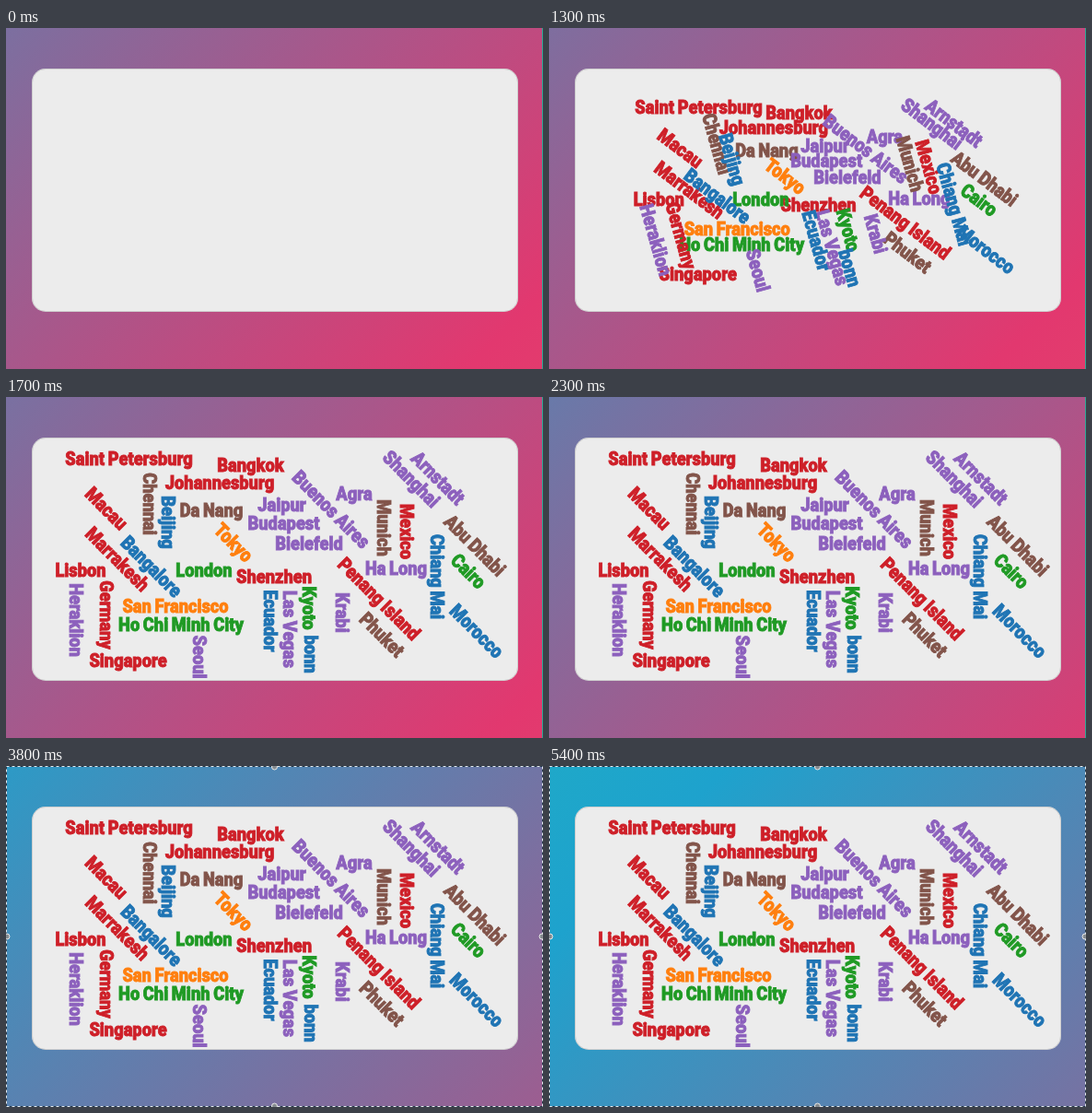
These frames come from a looping animation (583 by 370 pixels, 5.5 s). An HTML page:

```html
<!DOCTYPE html>
<html lang="en">
<head>
<meta charset="utf-8">
<title>City word cloud</title>
<style>
  html, body { margin: 0; width: 100%; height: 100%; overflow: hidden; }
  svg { display: block; width: 100vw; height: 100vh; }
  text {
    font: 900 21px Roboto, "Open Sans", "Liberation Sans", sans-serif;
    word-spacing: -1px;
    text-anchor: middle;
    stroke-width: .9;
  }
</style>
</head>
<body>
<svg id="stage" viewBox="0 0 583 370" preserveAspectRatio="none">
  <defs>
    <linearGradient id="sky" gradientUnits="userSpaceOnUse">
      <stop offset="0" stop-color="#ee7752"/>
      <stop offset=".3333" stop-color="#e2386f"/>
      <stop offset=".6667" stop-color="#1ea2cd"/>
      <stop offset="1" stop-color="#23d5ab"/>
    </linearGradient>
  </defs>
  <rect width="583" height="370" fill="url(#sky)"/>
  <rect x="582" width="1" height="370" fill="#2aa893"/>
  <rect x="28" y="44" width="528" height="264" rx="15" fill="#ececec"/>
  <rect x="28.5" y="44.5" width="527" height="263" rx="14.5" fill="none" stroke="#000" stroke-opacity=".125"/>
  <g id="cloud"></g>
  <g id="selection" fill="none">
    <rect x=".5" y=".5" width="582" height="369" stroke="#24384a"/>
    <rect x=".5" y=".5" width="582" height="369" stroke="#e4eaee" stroke-dasharray="3 3"/>
    <g id="handles" fill="#858b90" stroke="#e8e8e8"></g>
  </g>
</svg>
<script>
const LOOP = 5500, STEP = 100;
const RED = "#ce1f28", BLUE = "#1f74b4", GREEN = "#1f9a24",
      PURPLE = "#8c60bd", BROWN = "#82544a", ORANGE = "#ff7f0e";

// Words grouped by final angle: text, centre x, centre y, colour.
const groups = {
  0: [
    ["Saint Petersburg", 133.5, 67, RED], ["Bangkok", 265.5, 74, RED],
    ["Johannesburg", 232, 93, RED], ["Da Nang", 223, 123, BROWN],
    ["Lisbon", 81, 188, RED], ["Shenzhen", 291, 195, RED],
    ["London", 215, 188, GREEN], ["San Francisco", 184, 227, ORANGE],
    ["Ho Chi Minh City", 190, 247, GREEN], ["Singapore", 132.5, 286, RED],
    ["Agra", 378, 105, PURPLE], ["Jaipur", 299.5, 117, PURPLE],
    ["Budapest", 301.5, 137, PURPLE], ["Bielefeld", 329, 159, PURPLE],
    ["Ha Long", 423.5, 186, PURPLE]
  ],
  45: [
    ["Macau", 109, 121, RED], ["Marrakesh", 121, 176, RED],
    ["Penang Island", 405, 219, RED], ["Tokyo", 247, 158, ORANGE],
    ["Buenos Aires", 353, 122, PURPLE], ["Shanghai", 440, 89, PURPLE],
    ["Arnstadt", 469, 88, PURPLE], ["Abu Dhabi", 509, 161, BROWN],
    ["Phuket", 408, 258, BROWN], ["Cairo", 502, 189, GREEN],
    ["Bangalore", 158, 184, BLUE], ["Morocco", 511, 254, BLUE]
  ],
  90: [
    ["Chennai", 156, 116, BROWN], ["Munich", 410, 142, BROWN],
    ["Germany", 109, 236.5, RED], ["Mexico", 435, 146, RED],
    ["Heraklion", 76, 242, PURPLE], ["Seoul", 210, 282, PURPLE],
    ["Kyoto", 329, 229, GREEN], ["bonn", 331, 279, BLUE],
    ["Las Vegas", 308, 252, PURPLE], ["Krabi", 365, 234, PURPLE],
    ["Beijing", 176, 136, BLUE], ["Ecuador", 287, 243, BLUE],
    ["Chiang Mai", 468, 195, BLUE]
  ]
};

const byId = id => document.getElementById(id);
const sky = byId("sky"), cloud = byId("cloud"), selection = byId("selection");

function add(parent, tag, attrs) {
  const node = document.createElementNS("http://www.w3.org/2000/svg", tag);
  for (const key in attrs) node.setAttribute(key, attrs[key]);
  return parent.appendChild(node);
}

for (const [cx, cy] of [[291.5, 1], [291.5, 369], [1, 185], [582, 185]])
  add(byId("handles"), "circle", { cx, cy, r: 3 });

// Each word turns around the middle of its baseline.
const HALF_CAP = 7.2;
const words = Object.entries(groups).flatMap(([angle, list]) =>
  list.map(([label, cx, cy, color]) => {
    const rad = angle * Math.PI / 180;
    const node = add(cloud, "text", { fill: color, stroke: color });
    node.textContent = label;
    return {
      node, angle: +angle,
      x: cx - Math.sin(rad) * HALF_CAP,
      y: cy + Math.cos(rad) * HALF_CAP
    };
  }));

const clamp = v => Math.min(1, Math.max(0, v));
const mix = (a, b, p) => a + (b - a) * p;
const cubicInOut = t => t < .5 ? 4 * t ** 3 : 1 - 4 * (1 - t) ** 3;

// The CSS "ease" curve, cubic-bezier(.25, .1, .25, 1).
function ease(x) {
  const curve = (a, b, u) => 3 * a * u * (1 - u) ** 2 + 3 * b * u * u * (1 - u) + u ** 3;
  let low = 0, high = 1;
  for (let i = 0; i < 24; i++) {
    const mid = (low + high) / 2;
    if (curve(.25, .25, mid) < x) low = mid; else high = mid;
  }
  return curve(.1, 1, low);
}

// The background drifts back and forth, one sweep per 7.5 s.
function drawSky(time) {
  const TURN = 1300, SWEEP = 7500, SLOPE = .0002;
  const s = (time - TURN) / SWEEP;
  const drift = s < 0 ? 1 - ease(1 + s) : ease(s);
  const corner = .503 + .24 * drift;
  const from = corner / SLOPE / 2, to = (corner - 1) / SLOPE / 2;
  sky.setAttribute("x1", from);
  sky.setAttribute("y1", from);
  sky.setAttribute("x2", to);
  sky.setAttribute("y2", to);
}

function drawCloud(time) {
  const START = 652, DURATION = 1000, CENTER = [300, 184], CONDENSE = .87;
  cloud.style.display = time < START ? "none" : "";
  const p = cubicInOut(clamp((time - START) / DURATION));
  for (const { node, x, y, angle } of words) {
    const tx = mix(CENTER[0], x, p), ty = mix(CENTER[1], y, p);
    node.setAttribute("transform",
      `translate(${tx} ${ty}) rotate(${angle * p}) scale(${CONDENSE} 1)`);
  }
}

function draw(time) {
  drawSky(time);
  drawCloud(time);
  selection.style.display = time < 3700 ? "none" : "";
}

const began = performance.now();
function tick() {
  const time = (performance.now() - began) % LOOP;
  draw(Math.floor(time / STEP) * STEP);
  requestAnimationFrame(tick);
}
tick();
</script>
</body>
</html>
```
